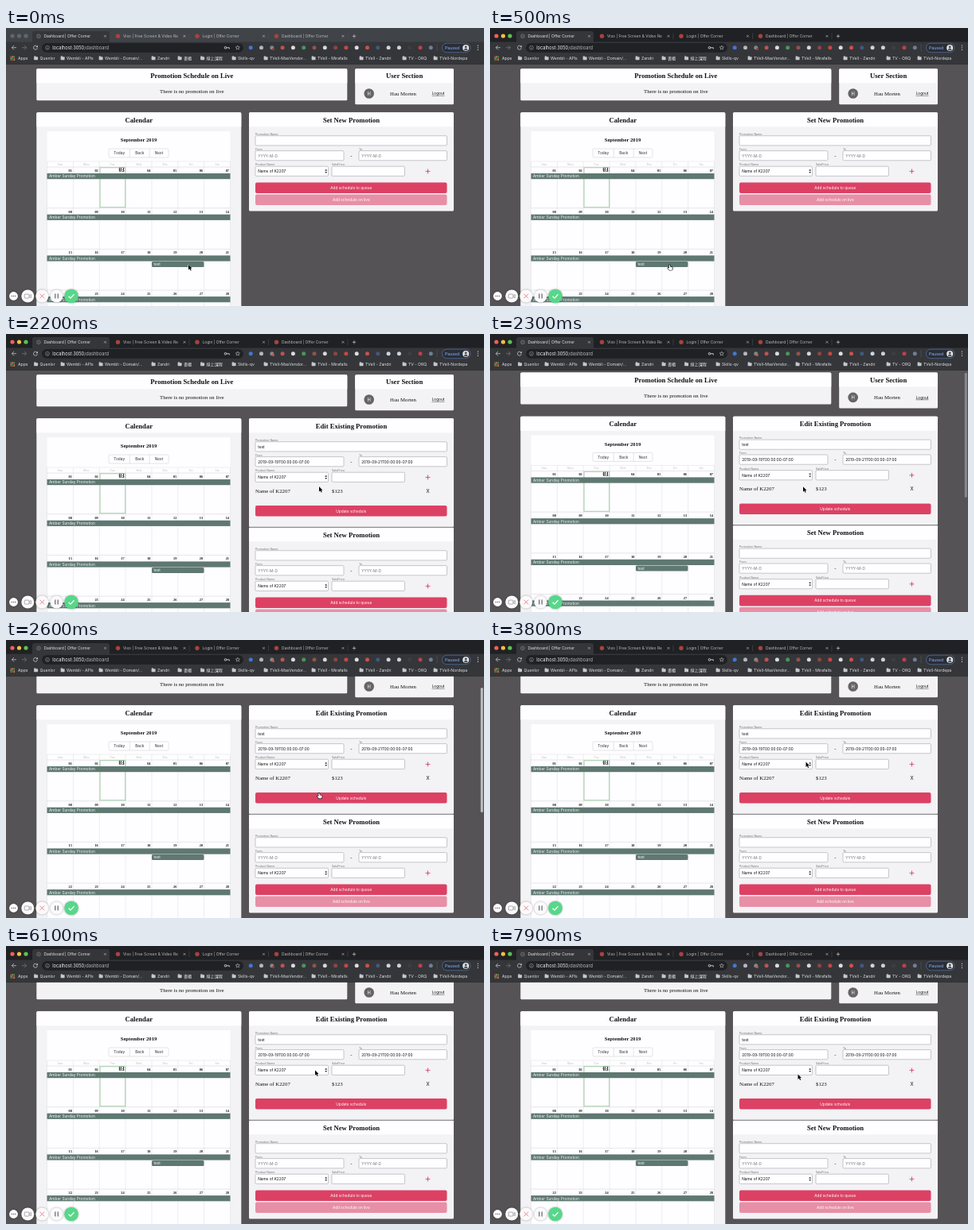
An HTML page with a canvas that plays this animation: 600x350 px, repeating every 8 s.

```html
<!DOCTYPE html>
<html lang="en">
<head>
<meta charset="utf-8">
<title>Dashboard</title>
<style>
html, body { margin: 0; width: 100%; height: 100%; overflow: hidden; background: #555355; }
canvas { display: block; width: 600px; height: 350px; }
</style>
</head>
<body>
<canvas id="stage"></canvas>
<script>
const LOOP = 8000;
const SANS = 'Inter, "Liberation Sans", sans-serif';
const SERIF = '"Liberation Serif", serif';
const CJK = '"Noto Sans CJK TC", "Noto Sans CJK", sans-serif';
const RED = '#dc4164', GREEN = '#5f7871', PALE = '#f3f2f5', WHITE = '#fefdff', INK = '#111';
const PRODUCT = 'Name of K2207', SITE = 'Offer Corner', EVENT = 'Amber Sunday Promotion';

const canvas = document.getElementById('stage');
const ctx = canvas.getContext('2d');
const ratio = window.devicePixelRatio || 1;
canvas.width = 600 * ratio;
canvas.height = 350 * ratio;

function rect(x, y, w, h, fill) {
  ctx.fillStyle = fill;
  ctx.fillRect(x, y, w, h);
}

function box(x, y, w, h, r, fill, stroke, width = 0.5) {
  ctx.beginPath();
  ctx.roundRect(x, y, w, h, r);
  if (fill) { ctx.fillStyle = fill; ctx.fill(); }
  if (stroke) { ctx.strokeStyle = stroke; ctx.lineWidth = width; ctx.stroke(); }
}

function dot(x, y, r, fill, stroke, width = 0.7) {
  ctx.beginPath();
  ctx.arc(x, y, r, 0, Math.PI * 2);
  if (fill) { ctx.fillStyle = fill; ctx.fill(); }
  if (stroke) { ctx.strokeStyle = stroke; ctx.lineWidth = width; ctx.stroke(); }
}

function line(points, color, width = 0.7) {
  ctx.beginPath();
  points.forEach(([x, y], i) => i ? ctx.lineTo(x, y) : ctx.moveTo(x, y));
  ctx.strokeStyle = color;
  ctx.lineWidth = width;
  ctx.stroke();
}

function shape(points, fill) {
  ctx.beginPath();
  points.forEach(([x, y]) => ctx.lineTo(x, y));
  ctx.closePath();
  ctx.fillStyle = fill;
  ctx.fill();
}

function text(str, x, y, size, color = INK, family = SANS, align = 'left', weight = 400) {
  ctx.font = `${weight} ${size}px ${family}`;
  ctx.textAlign = align;
  ctx.textBaseline = 'alphabetic';
  ctx.fillStyle = color;
  ctx.fillText(str, x, y);
}

function cross(x, y, r, color, width) {
  line([[x - r, y - r], [x + r, y + r]], color, width);
  line([[x + r, y - r], [x - r, y + r]], color, width);
}

function plus(x, y, r, color, width) {
  line([[x - r, y], [x + r, y]], color, width);
  line([[x, y - r], [x, y + r]], color, width);
}

function tabStrip(focused) {
  rect(0, 0, 600, 18, focused ? '#202124' : '#404347');
  const lights = focused ? ['#f4605a', '#f6be40', '#5bc454'] : Array(3).fill('#63666a');
  lights.forEach((c, i) => dot(8 + i * 8.5, 10, 2.6, c));
  box(33, 4, 97, 16, 3, '#35363a');
  const tabs = ['Dashboard | ' + SITE, 'Vixo | Free Screen & Video Re', 'Login | ' + SITE, 'Dashboard | ' + SITE];
  tabs.forEach((title, i) => {
    const x = 41 + i * 99.5;
    if (i) dot(x, 10.3, 2.7, '#a8423f');
    else dot(x, 10.3, 2.5, '#4b4d50', '#777', 0.6);
    ctx.save();
    ctx.beginPath();
    ctx.rect(x + 6, 2, 81, 14);
    ctx.clip();
    text(title, x + 6.5, 12.2, 4.9, i ? '#b9bbbe' : '#e6e7e9');
    ctx.restore();
    cross(x + 83.5, 10.3, 1.4, '#c5c7ca', 0.6);
    if (i) line([[x + 89.5, 6.5], [x + 89.5, 14]], '#55575b', 0.5);
  });
  plus(437, 10.3, 2.2, '#d0d2d5', 0.7);
}

function toolbar(t) {
  rect(0, 17.5, 600, 28, '#35363a');
  const gray = '#d5d7da';
  line([[13, 24.7], [7.5, 24.7]], gray);
  line([[10, 22], [7.3, 24.7], [10, 27.4]], gray);
  line([[20, 24.7], [25.5, 24.7]], '#7c7e82');
  line([[23, 22], [25.7, 24.7], [23, 27.4]], '#7c7e82');
  ctx.beginPath();
  ctx.arc(37, 24.7, 2.5, 0.2, 5.4);
  ctx.strokeStyle = gray;
  ctx.lineWidth = 0.7;
  ctx.stroke();
  shape([[39.8, 21.7], [39.8, 24.2], [37.4, 24.2]], gray);
  box(45, 19, 253, 11.8, 5.9, '#202124');
  dot(52, 24.8, 2.4, null, '#b7babd', 0.5);
  line([[52, 24.3], [52, 26.2]], '#b7babd', 0.6);
  text('localhost:3050', 58.2, 26.6, 5.7, '#f0f1f2');
  const host = ctx.measureText('localhost:3050').width;
  text('/dashboard', 58.2 + host, 26.6, 5.7, '#b4b8bc');
  dot(275.5, 24.8, 1.3, null, gray, 0.9);
  line([[276.9, 24.8], [280.3, 24.8], [280.3, 26.4]], gray, 0.9);
  const star = Array.from({ length: 11 }, (_, i) => {
    const a = i * Math.PI / 5 - Math.PI / 2, r = i % 2 ? 1.2 : 2.8;
    return [290.8 + r * Math.cos(a), 24.8 + r * Math.sin(a)];
  });
  line(star, gray, 0.5);
  const extensions = ['#3f78d8', '#b5b9be', '#7b8c86', '#bd5450', '#dcdcdc', '#4d9459', '#96504c', '#d8d8d8',
    '#8a4644', '#c94742', '#dedede', '#c9524a', '#41597c', '#c9d6e2', '#cfd1d4', '#3d3e42', '#c03f48', '#6d7f98'];
  extensions.forEach((c, i) => dot(307.2 + i * 13.3, 24.7, 2.5, c));
  dot(335.5, 26.5, 1.5, Math.floor(t / 200) % 2 ? '#d44e48' : '#a53d3a');
  line([[541, 20], [541, 29.5]], '#5a5c60', 0.5);
  box(547.5, 19.2, 35.5, 11.5, 5.75, '#292e38', '#668fc9', 0.5);
  text('Paused', 551, 26.7, 5.2, '#8ab4f8');
  dot(577.2, 25, 4, '#e4e4e6');
  dot(577.2, 23.8, 1.5, '#55565a');
  box(575, 25.6, 4.4, 2.6, [2, 2, 0.5, 0.5], '#55565a');
  [22.2, 24.8, 27.4].forEach(y => dot(592.4, y, 0.65, gray));
}

function bookmarks() {
  const colors = ['#db5b4f', '#e6b64d', '#59a868'];
  for (let i = 0; i < 9; i++) rect(5.7 + i % 3 * 2, 35.4 + Math.floor(i / 3) * 2, 1.4, 1.4, colors[(i + Math.floor(i / 3)) % 3]);
  text('Apps', 15, 40.1, 5.1, '#e2e3e5');
  const items = [[42.5, 'Quenlor'], [76, 'Wembli - APIs'], [124, 'Wembli - Domain/...'], [190, 'Zandri'],
    [223, '書櫃', CJK], [251.5, '線上課程', CJK], [291, 'Skills-qv'], [331, 'TVell-MaxVendor...'],
    [391, 'TVell - Mirafalls'], [451, 'TVell - Zandri'], [505, 'TV - ORQ'], [544, 'TVell-Nordepa']];
  items.forEach(([x, label, family]) => {
    box(x - 7.4, 36.2, 5, 4, 0.6, '#c5c8cc');
    rect(x - 7.2, 35.4, 2.2, 1.4, '#c5c8cc');
    text(label, x, 40.1, 5.1, '#e2e3e5', family);
  });
  rect(0, 45, 600, 0.6, '#242528');
}

function card(x, y, w, h, title) {
  box(x, y, w, h, 1.5, PALE);
  box(x, y, w, 18, [1.5, 1.5, 0, 0], WHITE);
  text(title, x + w / 2, y + 12.2, 8.65, INK, SERIF, 'center', 700);
}

function header() {
  card(38.3, 51.2, 390, 40, 'Promotion Schedule on Live');
  text('There is no promotion on live', 233.3, 82.3, 6.75, INK, SERIF, 'center');
  card(438.2, 51.2, 123.8, 45, 'User Section');
  dot(455.7, 82.5, 6.3, '#666467');
  text('H', 455.7, 84.6, 5.8, '#fff', SANS, 'center');
  text('Hau Morten', 498.5, 85, 6.75, INK, SERIF, 'center');
  text('Logout', 542.5, 84.4, 4.75, INK, SANS, 'center');
  line([[534.5, 85.4], [550.5, 85.4]], INK, 0.4);
}

function calendar() {
  const left = 51.5, top = 175, col = 32.86, row = 51.7;
  card(38.3, 106.3, 257, 330, 'Calendar');
  rect(left, 130, 230, 310, WHITE);
  text('September 2019', 166.5, 143.4, 6.65, INK, SERIF, 'center', 700);
  box(129, 152, 75, 11, 1.5, WHITE, '#c9c9c9');
  ['Today', 'Back', 'Next'].forEach((label, i) => text(label, [142.2, 167.8, 192][i], 159.3, 4.8, '#333', SANS, 'center'));
  [155.3, 180.2].forEach(x => line([[x, 152], [x, 163]], '#c9c9c9', 0.5));
  line([[left, 168], [left + 230, 168]], '#ddd', 0.5);
  ['Sun', 'Mon', 'Tue', 'Wed', 'Thu', 'Fri', 'Sat'].forEach((day, i) =>
    text(day, left + (i + 0.5) * col, 173, 4, '#bdbdbd', SERIF, 'center'));
  for (let i = 0; i <= 7; i++) line([[left + i * col, 168], [left + i * col, 440]], '#dcdcde', 0.5);
  for (let w = 0; w < 5; w++) {
    const y = top + w * row;
    line([[left, y], [left + 230, y]], '#cfcfd2', 0.5);
    for (let d = 0; d < 7; d++) {
      const date = w * 7 + d + 1, today = date === 3;
      if (date > 30) continue;
      text(String(date).padStart(2, '0'), left + (d + 1) * col - 1.5, y + (today ? 6.2 : 6), today ? 7.2 : 4.3, INK, SERIF, 'right', 700);
    }
  }
  box(118, 175.8, 31.8, 50, 0, null, '#a3cda9', 1.1);
  for (let w = 0; w < 5; w++) {
    const y = top + w * row + 8;
    rect(left, y, 230, 7.2, GREEN);
    text(EVENT, 54, y + 5.4, 4.8, '#f3f6f4');
  }
  box(183, 294, 65.5, 7, 1.5, GREEN);
  text('test', 185.5, 299.3, 4.8, '#f3f6f4');
}

function field(x, y, w, label, value, hint) {
  text(label, x, y - 1, 3.6, '#777');
  box(x, y, w, 12.2, 1.3, WHITE, '#a5a5a9', 0.6);
  if (value || hint) text(value || hint, x + 3.2, y + 7.9, 4.75, value ? INK : '#777');
}

function button(y, label, color) {
  box(313, y, 240.5, 13.6, 2, color);
  text(label, 433.3, y + 8.5, 4.75, '#fff', SANS, 'center');
}

function form(y, height, title, name, from, to) {
  card(305, y, 257, height, title);
  field(313, y + 29.4, 240.5, 'Promotion Name', name);
  field(313, y + 48.3, 111, 'From', from, 'YYYY-M-D');
  text('-', 433.3, y + 56.5, 6.5, INK, SERIF, 'center');
  field(443, y + 48.3, 110.5, 'To', to, 'YYYY-M-D');
  field(313, y + 67.9, 91.5, 'Product Name', PRODUCT);
  shape([[400.3, y + 73.4], [403.1, y + 73.4], [401.7, y + 71.3]], '#333');
  shape([[400.3, y + 74.7], [403.1, y + 74.7], [401.7, y + 76.8]], '#333');
  field(409, y + 67.9, 91.5, 'SalePrice');
  plus(529.5, y + 74.1, 2.9, RED, 0.9);
}

function newForm(y) {
  form(y, 124.3, 'Set New Promotion');
  button(y + 88.1, 'Add schedule to queue', RED);
  button(y + 103.2, 'Add schedule on live', '#e78fa6');
}

function editForm() {
  form(106.3, 137, 'Edit Existing Promotion', 'test', '2019-09-19T00:00:00-07:00', '2019-09-21T00:00:00-07:00');
  text(PRODUCT, 313, 199.6, 6.8, INK, SERIF);
  text('$123', 409, 199.6, 6.8, INK, SERIF);
  text('X', 529.5, 199.7, 6, INK, SANS, 'center');
  button(216, 'Update schedule', RED);
}

function recorder() {
  ctx.save();
  ctx.shadowColor = 'rgba(0,0,0,.35)';
  ctx.shadowBlur = 2.5;
  dot(9.5, 337.5, 5.4, '#fff');
  [27.3, 45.3, 63.5].forEach(x => dot(x, 337.5, 8, '#fbfafb'));
  dot(82, 337.5, 8.8, '#57d78a');
  ctx.restore();
  [7.4, 9.5, 11.6].forEach(x => dot(x, 337.5, 0.65, '#555'));
  box(23.2, 335.1, 5.8, 5, 1, null, '#8a8a8f', 0.7);
  line([[29, 337], [31.4, 335.5], [31.4, 339.7], [29, 338.2]], '#8a8a8f', 0.7);
  cross(45.3, 337.5, 2.8, '#e87983', 0.9);
  [61.8, 65.2].forEach(x => line([[x, 334.5], [x, 340.5]], '#626268', 1.2));
  line([[78.6, 337.7], [81, 340.1], [85.5, 335.2]], '#fff', 1.3);
}

// Pointer stops: time, x, y
const PATH = [[0, 229, 298], [300, 229, 298], [1000, 211.5, 300], [1800, 211.5, 300], [2150, 393, 192],
  [2600, 393, 193], [2900, 394, 190], [3500, 396.5, 153.5], [5800, 396.5, 153.5],
  [6100, 388, 156.5], [6600, 386.5, 161.5], [LOOP, 386.5, 161.5]];

const ease = u => u * u * (3 - 2 * u);
const progress = (t, a, b) => ease(Math.min(1, Math.max(0, (t - a) / (b - a))));

function pointer(t) {
  const i = Math.max(1, PATH.findIndex(p => p[0] > t));
  const [t0, x0, y0] = PATH[i - 1], [t1, x1, y1] = PATH[i];
  const u = progress(t, t0, t1);
  return [x0 + (x1 - x0) * u, y0 + (y1 - y0) * u];
}

function drawPointer(t) {
  const [x, y] = pointer(t);
  const hand = t >= 400 && t < 1850 || t >= 2420 && t < 2900;
  ctx.save();
  ctx.translate(x, y);
  ctx.lineJoin = 'round';
  ctx.beginPath();
  const points = hand
    ? [[-0.7, 0], [0.5, 0], [0.8, 2.3], [3, 2.8], [3.7, 3.7], [3.1, 6.3], [0, 6.5], [-2.4, 4], [-1.8, 3.3], [-0.5, 4]]
    : [[0, 0], [0, 6.4], [1.5, 5.1], [2.6, 7.5], [3.7, 7], [2.6, 4.7], [4.5, 4.6]];
  points.forEach(([px, py]) => ctx.lineTo(px, py));
  ctx.closePath();
  ctx.fillStyle = hand ? '#fff' : '#000';
  ctx.strokeStyle = hand ? '#111' : '#fff';
  ctx.lineWidth = hand ? 1.3 : 0.9;
  ctx.stroke();
  ctx.fill();
  ctx.restore();
}

function draw(t) {
  ctx.setTransform(ratio, 0, 0, ratio, 0, 0);
  rect(0, 0, 600, 350, '#555355');
  const scroll = 24 * progress(t, 2250, 2500);
  ctx.save();
  ctx.translate(0, -scroll);
  header();
  calendar();
  if (t >= 1900) {
    editForm();
    newForm(243.3);
    line([[305, 243.3], [562, 243.3]], '#555355', 0.8);
  } else {
    newForm(106.3);
  }
  ctx.restore();
  ctx.globalAlpha = progress(t, 2250, 2350) * (1 - progress(t, 3100, 3400));
  box(595.8, 47.5 + scroll * 0.52, 3, 157, 1.5, '#bfbdc0');
  ctx.globalAlpha = 1;
  tabStrip(t >= 200);
  toolbar(t);
  bookmarks();
  recorder();
  drawPointer(t);
}

function tick() {
  draw(performance.now() % LOOP);
  requestAnimationFrame(tick);
}
tick();
</script>
</body>
</html>
```
